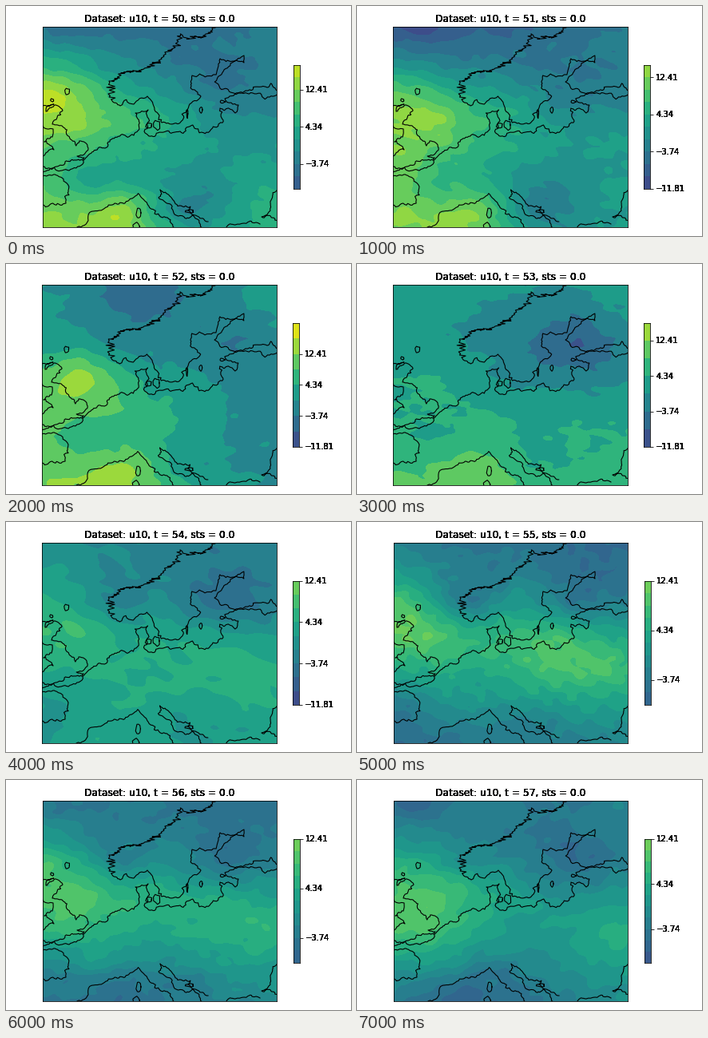
These frames come from a looping animation (432 by 288 pixels, 8000 ms). A matplotlib script:

```python
import numpy as np
import matplotlib.pyplot as plt
from matplotlib.animation import FuncAnimation

W, H = 432, 288
LEFT, RIGHT, TOP, BOTTOM = 46, 339, 26, 277
BASE, TICK = -11.81, 8.073          # lowest colourbar tick and tick spacing
VMIN, VMAX = BASE - TICK, BASE + 4 * TICK
START, HOURS = 50, 8

# Wind by region: place on the map, then its speed at the key hours
KEY_HOURS = (50, 51, 52, 53, 55, 57)
REGIONS = {
    "norwegian sea": (65, 32, -4.5, -9.5, .5, 2.5, -2, -6),
    "arctic coast": (165, 40, -4, -6, -6, 1, -4, -2.5),
    "lapland": (320, 50, -3, -3, 1.5, 1, -5.5, -2.5),
    "scotland": (52, 110, 16, 10, 4.5, 2, 10.5, 6),
    "north sea": (98, 142, 13, 13, 14, 4.5, 9.5, 9),
    "fjords": (138, 102, 4, 2, -1, 0, -3.5, 0),
    "sweden": (205, 85, -2, -2, -2.5, -2.5, 0, -3),
    "bothnia": (275, 100, -4.5, -4, -4.5, -8, -4, -5.5),
    "denmark": (180, 135, 6, 5.5, 2, -.5, 6, 3),
    "baltic": (250, 155, 2, 1.5, 2, 0, 9.5, 1),
    "east": (320, 180, 1, 2, -2, 3, 8, 4.5),
    "channel": (65, 185, 8, 11.5, 10, 4.5, 4.5, 9),
    "germany": (150, 190, 4, 5, 7, 5, 4, 4),
    "biscay": (60, 232, 9.5, 11, 9.5, 6, -3.5, 1),
    "france": (105, 222, 3.5, 6, 6, 4.5, 1, 3),
    "gulf of lion": (145, 258, 14, 13, 14, 11, -2.5, -6),
    "adriatic": (222, 252, -2, -3, 2, 4.5, -2, -3),
    "black sea": (325, 245, 5, 2, -1, 5.5, 1, 2),
}

# Colourbar of each hour: bands per tick, first and last level
SCALES = [(3, 1, 11), (3, 0, 10), (2, 0, 8), (2, 0, 7),
          (3, 0, 9), (4, 2, 12), (4, 2, 12), (4, 1, 12)]

# Corner points of the coasts; the detail between them is generated
NORWAY = [(262, 27), (236, 38), (209, 50), (183, 71), (155, 83), (129, 94),
          (128, 110), (132, 117)]
COASTS = [
    # Skagerrak, Sweden and Finland
    [(132, 117), (143, 125), (160, 123), (177, 113), (186, 130), (195, 146),
     (211, 147), (222, 141), (229, 125), (244, 113), (232, 100), (233, 87),
     (266, 75), (268, 66), (298, 62), (298, 71), (268, 87), (268, 103),
     (300, 106), (340, 106)],
    # Estonia to Brittany
    [(340, 110), (309, 109), (274, 116), (291, 124), (287, 134), (268, 128),
     (266, 148), (255, 157), (226, 152), (200, 157), (173, 157), (177, 139),
     (178, 130), (162, 134), (160, 162), (132, 167), (124, 178), (100, 190),
     (96, 198), (79, 206), (62, 205), (46, 208)],
    # Bay of Biscay
    [(46, 213), (70, 215), (78, 231), (75, 247), (46, 249)],
    # Britain, east then west
    [(46, 125), (60, 123), (50, 132), (71, 131), (58, 148), (70, 150), (80, 166),
     (99, 171), (103, 178), (89, 188), (98, 190), (74, 195), (46, 201)],
    [(46, 150), (59, 154), (58, 164), (48, 170), (60, 180), (46, 188)],
    # Mediterranean, Adriatic, Aegean, Black Sea
    [(89, 277), (117, 256), (133, 249), (158, 241), (172, 242), (186, 260), (213, 278)],
    [(246, 278), (213, 262), (191, 240), (193, 230), (205, 238), (253, 270)],
    [(276, 277), (298, 272), (318, 273)],
    [(340, 229), (333, 241), (329, 258), (320, 264), (340, 268)],
]
# Islands as centre and radii
ISLANDS = [(77, 107, 3, 4), (58, 118, 2, 2), (179, 150, 4, 3), (189, 149, 4, 6),
           (244, 130, 2, 4), (227, 135, 1, 5), (271, 120, 3, 2), (166, 259, 3, 7),
           (163, 276, 5, 6), (230, 257, 5, 2)]


def roughen(points, rng, amp=.15):
    """Split each run at a displaced midpoint until the steps are short."""
    def split(a, b):
        dx, dy = b - a
        if np.hypot(dx, dy) < 3:
            return [a]
        mid = (a + b) / 2 + rng.normal(0, amp) * np.array([-dy, dx])
        return split(a, mid) + split(mid, b)

    points = np.array(points, float)
    out = [p for a, b in zip(points, points[1:]) for p in split(a, b)]
    return np.array(out + [points[-1]])


def fjords(points, rng):
    """Cut every other step of a coast inland."""
    line = roughen(points, rng)
    cuts = line[1:-1:2]
    cuts[:, 0] += rng.uniform(0, 9, len(cuts))
    return line


def island(cx, cy, rx, ry, rng):
    angle = np.linspace(0, 2 * np.pi, 10)
    size = rng.uniform(.7, 1.2, angle.size)
    size[-1] = size[0]
    return np.column_stack([cx + rx * size * np.cos(angle), cy + ry * size * np.sin(angle)])


def make_lines():
    rng = np.random.default_rng(4)
    return ([fjords(NORWAY, rng)] + [roughen(c, rng) for c in COASTS]
            + [island(*i, rng) for i in ISLANDS])


GX, GY = np.meshgrid(np.linspace(LEFT, RIGHT, 148), np.linspace(TOP, BOTTOM, 127))


def ripple(seed):
    """Small smooth disturbance that makes the contours uneven."""
    rng = np.random.default_rng(seed)
    z = np.zeros_like(GX)
    for _ in range(26):
        kx, ky = rng.normal(0, (.11, .17))
        z += np.sin(kx * GX + ky * GY + rng.uniform(0, 2 * np.pi))
    return .13 * z


def kernel(dx, dy):
    """Distance measure drawn out from west to east, like the wind bands."""
    return np.sqrt((dx / 1.4) ** 2 + dy ** 2 + 64)


def wind(hour):
    """Multiquadric interpolation between the regions at one hour."""
    table = np.array(list(REGIONS.values()), float)
    x, y = table[:, 0], table[:, 1]
    v = np.array([np.interp(hour, KEY_HOURS, row) for row in table[:, 2:]])
    weights = np.linalg.solve(kernel(x[:, None] - x, y[:, None] - y), v - v.mean())
    z = v.mean() + ripple(hour)
    for px, py, w in zip(x, y, weights):
        z = z + w * kernel(GX - px, GY - py)
    return z


FIELDS = [wind(START + i) for i in range(HOURS)]
LINES = make_lines()

fig = plt.figure(figsize=(W / 72, H / 72), dpi=72, facecolor="white")
ax = fig.add_axes([0, 0, 1, 1])
cax = fig.add_axes([0, 0, .1, .1])


def place(axes, x0, y0, x1, y1):
    axes.set_position([x0 / W, 1 - y1 / H, (x1 - x0) / W, (y1 - y0) / H])


def heavy(axes, *args, **style):
    """Stacked passes darken the soft edges of the lettering."""
    for _ in range(8):
        axes.annotate(*args, textcoords="offset points", annotation_clip=False, **style)


def draw(i):
    per_tick, first, last = SCALES[i]
    levels = BASE + TICK / per_tick * np.arange(first, last + 1)
    low, high = levels[0], levels[-1]
    shift = 1 if first == 0 else 0      # the longer lowest label widens the layout
    style = dict(cmap="viridis", vmin=VMIN, vmax=VMAX)

    ax.clear()
    place(ax, LEFT - shift, TOP, RIGHT, BOTTOM)
    ax.contourf(GX, GY, np.clip(FIELDS[i], low + .01, high - .01), levels=levels, **style)
    for line in LINES:
        ax.plot(*line.T, color="black", lw=1.1)
    ax.set(xlim=(LEFT, RIGHT), ylim=(BOTTOM, TOP), xticks=[], yticks=[])
    heavy(ax, f"Dataset: u10, t = {START + i}, sts = 0.0", (.5, 1), (0, 6),
          xycoords="axes fraction", ha="center", va="baseline", fontsize=12.3)

    cax.clear()
    place(cax, 360.2 - shift, 73.8, 367.7 - shift / 2, 228.9)
    mids = (levels[:-1] + levels[1:]) / 2
    cax.pcolormesh([0, 1], levels, mids[:, None], **style)
    ticks = [v for v in BASE + TICK * np.arange(4) if low - .01 < v < high + .01]
    cax.set(xlim=(0, 1), ylim=(low, high), xticks=[], yticks=ticks)
    cax.tick_params(right=True, left=False, labelleft=False)
    for v in ticks:
        heavy(cax, f"{v:.2f}".replace("-", "\u2212"), (1, v), (7, .6),
              xycoords=("axes fraction", "data"), va="center_baseline", fontsize=10)
    return []


anim = FuncAnimation(fig, draw, frames=HOURS, interval=1000,
                     init_func=lambda: [], repeat=True, repeat_delay=0, blit=False)
plt.show()
```
